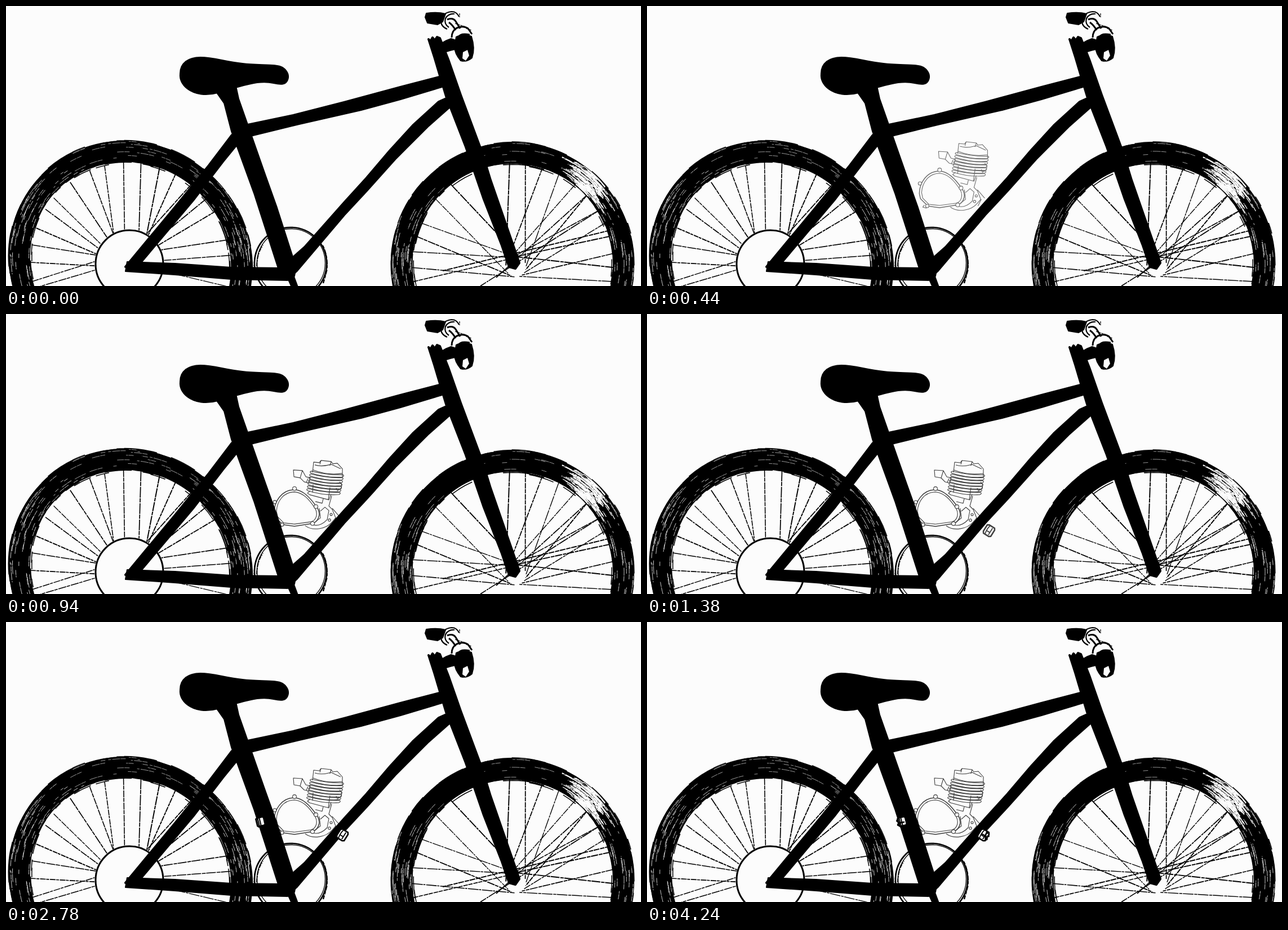
An HTML page for the animation above (4500 ms loop, 1127x497 px).

```html
<!DOCTYPE html>
<html lang="en">
<head>
<meta charset="utf-8">
<title>Bicycle engine kit</title>
<style>
  html, body { margin: 0; width: 100%; height: 100%; overflow: hidden; background: #fcfcfc; }
  svg { display: block; width: 100vw; height: 100vh; }
  .line { fill: none; stroke: #000; }
  .dry { fill: none; stroke: #fcfcfc; }
  #frame > path { stroke: #000; stroke-width: 2; stroke-linejoin: round; }
  #frame > .tube { stroke-width: 4; }
</style>
</head>
<body>
<svg viewBox="0 0 1127 497">
  <g id="spokes"></g>
  <g id="rear" transform="translate(-23 0) skewX(2.9)"></g>
  <g id="front"></g>

  <g class="line">
    <circle cx="219" cy="458" r="60" stroke-width="3"/>
    <circle cx="505" cy="457" r="64" stroke-width="2.6"/>
    <circle cx="506" cy="456" r="60.5" stroke-width="1.3"/>
    <path d="M441 470Q438 440 454 418M446 475Q442 445 456 424" stroke-width="2" stroke-dasharray="7 1 3 2"/>
    <path d="M562 425Q572 445 569 470L563 492" stroke-width="2.5" stroke-dasharray="6 2 9 1"/>
  </g>

  <g id="engine" fill="none" stroke="#3c3c3c" stroke-width="1.1" stroke-linejoin="round">
    <path d="M544 281L546 263L556 264L559 260L577 262L580 266L588 265L597 275L597 290M548 268Q560 272 577 267L594 275M545 277Q570 287 597 283M559 260L557 267M577 262L575 269"/>
    <path id="fins"/>
    <path d="M540 314L535 318L539 321L573 330L577 320M545 303L544 317M575 308L572 329M563 328L561 336L549 333M592 298L596 303L595 310L588 314L586 309"/>
    <path d="M510 277L526 278L532 289L540 291L537 300L529 298L522 291L511 289ZM526 278L522 291M536 292L533 299"/>
    <path d="M476 352C476 333 489 312 512 312C526 313 538 323 553 345C560 357 553 369 544 372L512 377L491 374L478 361Z" stroke-width="1.5"/>
    <path d="M480 350C481 333 492 316 512 316C526 317 537 327 549 346C554 356 550 367 541 369L512 373L493 371L482 360Z"/>
    <path d="M531 376C545 386 568 382 579 369L585 362L579 347L573 341L578 323M538 372Q555 381 570 365L573 349L566 343L558 350M556 345L558 362L549 369M579 345L592 360M580 374L586 362M485 372L482 376L489 378"/>
    <g id="nuts" fill="#fcfcfc"></g>
  </g>

  <g id="frame">
    <path d="M309 120C309 101 324 91 345 91C370 91 388 99 420 102C448 106 480 102 491 109C500 115 503 124 500 131C497 140 488 140 475 137C453 132 434 138 407 145L376 154C355 160 335 157 322 147C312 139 308 130 309 120Z"/>
    <path class="tube" d="M374 152L407 142L412 165L432 222L460 302L480 358L514 464L511 479L488 478L470 422L441 332L401 222L388 172Z"/>
    <path class="tube" d="M424 212L510 194L600 171L700 144L777 124L780 141L700 165L630 184L520 209L430 231Z"/>
    <path class="tube" d="M768 170L788 161L791 176L748 214L692 270L640 328L600 371L516 470L500 484L496 458L530 428L600 349L640 305L680 258L722 212Z"/>
    <path d="M215 454L300 457L400 464L492 465L500 487L400 485L300 477L212 471Z"/>
    <path class="tube" d="M401 229L360 283L300 357L212 463L235 460L332 345L385 276L416 238Z"/>
    <path class="tube" d="M750 59L753 63L757 56L761 61L765 55L770 57L785 95L807 158L845 260L860 309L911 456L904 466L893 463L880 425L848 343L816 250L781 160L760 90Z"/>
    <path d="M499 481L511 480L518 499L507 499Z"/>
    <path d="M771 67L780 62L790 58L801 62L800 76L788 79L775 83Z"/>
    <path d="M746 13Q765 10 780 14L775 28L766 33L748 30L744 20Z"/>
    <path d="M799 55Q812 48 826 54Q833 75 827 92Q818 100 807 97Q796 84 796 72Z"/>
    <g fill="#fcfcfc"><path d="M811 82L819 78L822 88L816 97L810 93Z"/></g>
    <g class="line">
      <path d="M783 41Q771 36 772 25Q776 11 791 10Q800 10 804 19M786 38Q777 32 780 22Q785 13 796 14" stroke-width="2.2"/>
      <path d="M783 24Q793 20 798 27L806 40M786 29Q793 34 798 43" stroke-width="3"/>
      <path d="M791 56Q791 44 800 39Q812 34 820 40L827 50M804 55Q806 48 823 51" stroke-width="3"/>
      <path d="M797 31L816 37M805 13L805 20M817 40L826 43" stroke-width="1.2" stroke-dasharray="4 1"/>
    </g>
  </g>

  <g id="clampR"><g transform="translate(597 378) rotate(32)">
    <path d="M-8 -7L-5 -9H6L8 -6V7L5 9H-6L-8 6Z" fill="#fcfcfc" stroke="#000" stroke-width="2.6"/>
    <path d="M-3 -8Q-5 0 -3 8M3 -7V7M-3 2H3" class="line" stroke-width="1.8"/>
  </g></g>
  <g id="clampL"><g transform="translate(453 354) rotate(-14)">
    <path d="M-7 -6L-4 -8H5L7 -6V6L5 8H-5L-7 6Z" fill="#fcfcfc" stroke="#000" stroke-width="3.4"/>
    <path d="M-1 -8V8M-4 -8V8" class="line" stroke-width="2"/>
  </g></g>
  <g id="boltR">
    <path d="M594 376L603 381M603 373L600 381L602 385" class="line" stroke-width="2.4"/>
    <circle cx="604" cy="374" r="2.3"/><circle cx="602" cy="385" r="2.8"/><circle cx="606" cy="380" r="2"/>
  </g>
  <g id="boltL">
    <path d="M445 357L457 355M445 353L448 359" class="line" stroke-width="2.6"/>
    <circle cx="444" cy="353" r="2"/><circle cx="446" cy="360" r="2.3"/>
  </g>
</svg>

<script>
const $ = id => document.getElementById(id);
const NS = 'http://www.w3.org/2000/svg';
let seed = 7;
const rnd = (lo = 0, hi = 1) => {
  seed = (seed * 16807) % 2147483647;
  return lo + (hi - lo) * seed / 2147483647;
};
const add = (parent, tag, attrs) => {
  const el = document.createElementNS(NS, tag);
  for (const k in attrs) el.setAttribute(k, attrs[k]);
  return parent.appendChild(el);
};
const polar = (cx, cy, r, deg) => {
  const a = deg * Math.PI / 180;
  return (cx + r * Math.cos(a)).toFixed(1) + ' ' + (cy - r * Math.sin(a)).toFixed(1);
};
const arc = (cx, cy, r, a, b) => `M${polar(cx, cy, r, a)}A${r} ${r} 0 0 0 ${polar(cx, cy, r, b)}`;

// Brushed tyre: solid ring, frayed edges, then dry streaks per zone [middle, spread, count, width]
function tyre(g, cx, cy, zones) {
  add(g, 'circle', { class: 'line', cx, cy, r: 197, 'stroke-width': 38 });
  let fray = '';
  for (let i = 0; i < 90; i++) {
    const a = rnd(-15, 190), r = i % 2 ? rnd(213, 217) : rnd(175, 180);
    fray += arc(cx, cy, r, a, a + rnd(4, 16));
  }
  add(g, 'path', { class: 'line', d: fray, 'stroke-width': 1.5 });
  for (const [mid, spread, count, width] of zones) {
    let d = '';
    for (let i = 0; i < count; i++) {
      const a = mid + (rnd(-1, 1) + rnd(-1, 1)) * spread / 2, len = rnd(1, 9);
      d += arc(cx, cy, rnd(180, 215), a - len / 2, a + len / 2);
    }
    add(g, 'path', { class: 'dry', d, 'stroke-width': width, 'stroke-dasharray': '9 1 14 2 5 3' });
  }
}

function spoke(from, to) {
  add($('spokes'), 'path', {
    class: 'line', d: `M${from}L${to}`, 'stroke-width': rnd(1.3, 2),
    'stroke-dasharray': `${rnd(8, 20)} 1 ${rnd(3, 8)} 1.5`
  });
}

// Rear spokes as [rim angle, sprocket angle]
[[-14, -12], [-4, -3], [4, 6], [13, 24], [31, 33], [40, 42], [52, 60], [63, 57], [73, 60], [84, 74],
 [94, 98], [105, 117], [114, 118], [127, 130], [140, 145], [148, 153], [160, 163], [170, 165],
 [180, 183], [191, 176], [195, 190]]
  .forEach(([a, b]) => spoke(polar(221, 455, 178, a), polar(219, 458, 62, b)));

[-10, -2, 6, 16, 24, 32, 43, 52, 63, 73, 83, 92, 128, 140, 156, 164, 173, 182, 190]
  .forEach((a, i) => spoke(polar(900, 458, 179, a), polar(905, 463, 18, a + (i % 2 ? 80 : -60))));
[['1060 358', '842 497'], ['1073 398', '775 470'], ['1034 333', '870 482']].forEach(s => spoke(...s));

tyre($('rear'), 221, 455, [[15, 45, 60, .8], [85, 50, 24, .6], [155, 45, 65, .8]]);
tyre($('front'), 899, 458, [[10, 30, 30, .8], [46, 18, 130, 1.2], [48, 11, 70, 1.5], [100, 50, 16, .6], [172, 35, 55, .8]]);

// Cooling fins and cover bolts
let fins = '';
for (let i = 0; i < 7; i++) {
  const x = 542 - i, y = 279 + i * 5.2;
  fins += `M${x} ${y}q-4 1 -1 3.4q28 9 56 7q4 -2 1 -4q-28 1 -56 -6.4`;
}
$('fins').setAttribute('d', fins);
[[477, 334, 3], [512, 310, 3.4], [550, 342, 3.4], [544, 372, 3.4], [490, 374, 3],
 [577, 356, 2], [574, 366, 2.2]].forEach(([cx, cy, r]) => add($('nuts'), 'circle', { cx, cy, r }));

// cubic-bezier(.25, .1, .25, 1)
function ease(x) {
  if (x <= 0) return 0;
  if (x >= 1) return 1;
  let lo = 0, hi = 1;
  const bez = (p, q, u) => 3 * p * u * (1 - u) ** 2 + 3 * q * u * u * (1 - u) + u ** 3;
  for (let i = 0; i < 22; i++) {
    const m = (lo + hi) / 2;
    if (bez(.25, .25, m) < x) lo = m; else hi = m;
  }
  return bez(.1, 1, lo);
}

// [id, start, duration, dx, dy]
const parts = [
  ['engine', 0, 1000, 28, -72],
  ['clampR', 940, 1000, 38, 25],
  ['clampL', 1885, 1200, -24, 9],
  ['boltR', 3220, 500, 20, 20],
  ['boltL', 3740, 500, -21, 6]
].map(([id, ...rest]) => [$(id), ...rest]);

function draw(t) {
  for (const [el, start, dur, dx, dy] of parts) {
    const p = ease((t - start) / dur), q = 1 - p;
    el.setAttribute('transform', `translate(${dx * q} ${dy * q})`);
    el.setAttribute('opacity', p);
  }
}

const t0 = performance.now();
function tick() {
  draw((performance.now() - t0) % 4500);
  requestAnimationFrame(tick);
}
tick();
</script>
</body>
</html>
```
